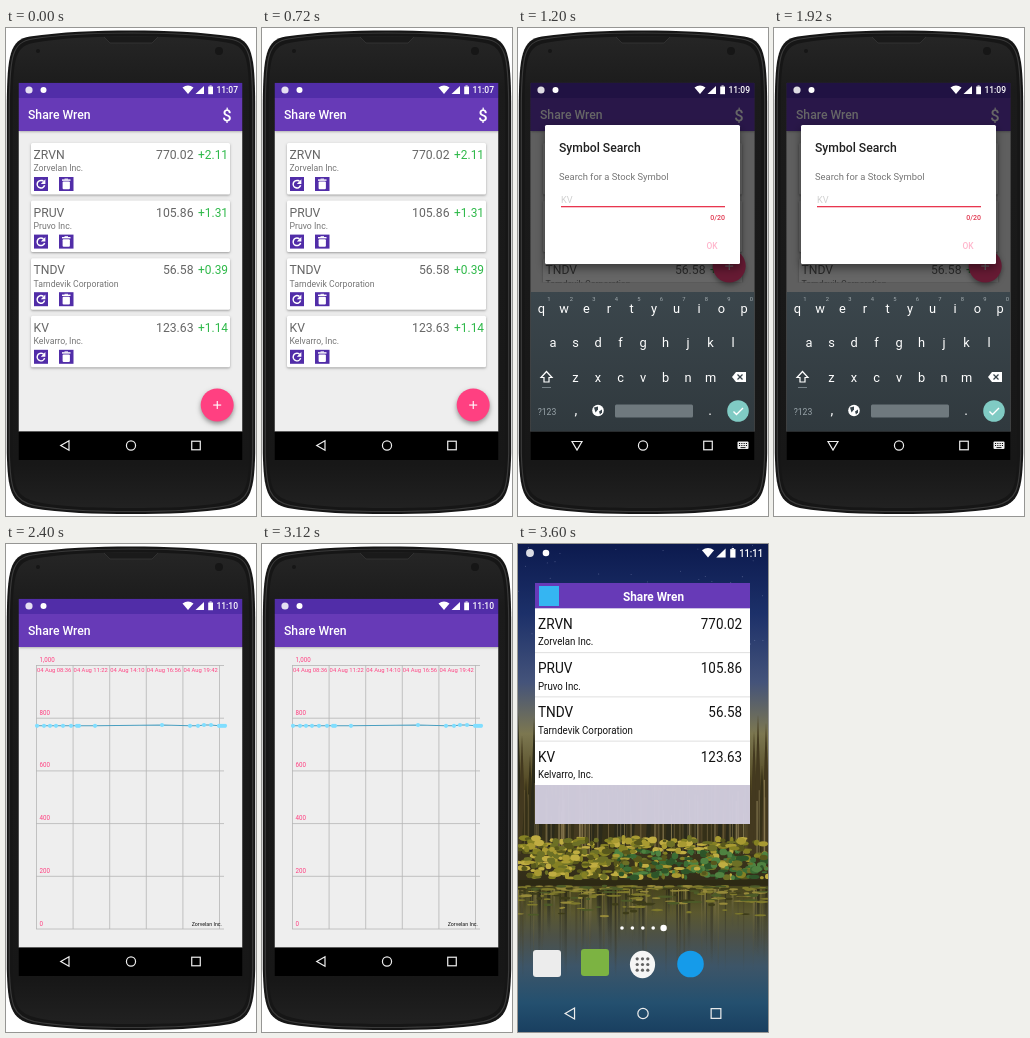
An HTML page with a canvas that plays this animation: 250x488 px, repeating every 4800 ms.

```html
<!DOCTYPE html>
<html lang="en">
<head>
<meta charset="utf-8">
<title>Share Wren</title>
<style>
html, body { margin: 0; width: 100%; height: 100%; overflow: hidden; background: #fff; }
canvas { display: block; width: 250px; height: 488px; }
</style>
</head>
<body>
<canvas id="stage"></canvas>
<script>
const W = 250, H = 488, HOLD = 1200;
const canvas = document.getElementById('stage');
const ctx = canvas.getContext('2d');
const dpr = window.devicePixelRatio || 1;
canvas.width = W * dpr;
canvas.height = H * dpr;

const APP = 'Share Wren';
const PURPLE = '#673ab7', DEEP = '#512da8', PINK = '#ff4081';
const LEFT = 12.5, TOP = 54.7, WIDE = 224, NAV = 403.6, BOTTOM = 432;
const STOCKS = [
  ['ZRVN', 'Zorvelan Inc.', '770.02', '+2.11'],
  ['PRUV', 'Pruvo Inc.', '105.86', '+1.31'],
  ['TNDV', 'Tarndevik Corporation', '56.58', '+0.39'],
  ['KV', 'Kelvarro, Inc.', '123.63', '+1.14']
];

// Vertical pixel aspect of the current screen
let aspect = 1;

function text(s, x, y, size, color, align = 'left', weight = 400) {
  ctx.save();
  ctx.translate(x, y);
  ctx.scale(1, aspect);
  ctx.font = `${weight} ${size}px Roboto, sans-serif`;
  ctx.textAlign = align;
  ctx.fillStyle = color;
  ctx.fillText(s, 0, 0);
  ctx.restore();
}

function rect(x, y, w, h, color) {
  ctx.fillStyle = color;
  ctx.fillRect(x, y, w, h);
}

function round(x, y, w, h, r, color) {
  ctx.beginPath();
  ctx.roundRect(x, y, w, h, r);
  ctx.fillStyle = color;
  ctx.fill();
}

function oval(x, y, rx, ry, color) {
  ctx.beginPath();
  ctx.ellipse(x, y, rx, ry, 0, 0, Math.PI * 2);
  ctx.fillStyle = color;
  ctx.fill();
}

function dot(x, y, r, color) {
  oval(x, y, r, r, color);
}

function trace(points, closed) {
  ctx.beginPath();
  points.forEach(([x, y]) => ctx.lineTo(x, y));
  if (closed) ctx.closePath();
}

function poly(points, color) {
  trace(points, true);
  ctx.fillStyle = color;
  ctx.fill();
}

function line(points, color, width = 1, closed = false) {
  trace(points, closed);
  ctx.strokeStyle = color;
  ctx.lineWidth = width;
  ctx.stroke();
}

function ring(x, y, r, color, width, from = 0, to = Math.PI * 2) {
  ctx.beginPath();
  ctx.arc(x, y, r, from, to);
  ctx.strokeStyle = color;
  ctx.lineWidth = width;
  ctx.stroke();
}

function gradient(y0, y1, stops) {
  const g = ctx.createLinearGradient(0, y0, 0, y1);
  stops.forEach(([at, color]) => g.addColorStop(at, color));
  return g;
}

function shadow(blur, dy, alpha, draw) {
  ctx.save();
  ctx.shadowColor = `rgba(0,0,0,${alpha})`;
  ctx.shadowBlur = blur * dpr;
  ctx.shadowOffsetY = dy * dpr;
  draw();
  ctx.restore();
}

function clipped(x, y, w, h, draw) {
  ctx.save();
  ctx.beginPath();
  ctx.rect(x, y, w, h);
  ctx.clip();
  draw();
  ctx.restore();
}

function random(seed) {
  return () => (seed = (seed * 16807) % 2147483647) / 2147483647;
}

function bodyPath(d) {
  const l = 0.8 + d, r = W - l, t = 2.5 + d, b = 486 - d;
  ctx.beginPath();
  ctx.moveTo(l, 75);
  ctx.bezierCurveTo(l + 0.5, 28, l + 3, t + 9, l + 23, t + 6);
  ctx.bezierCurveTo(55, t + 1.5, 90, t, 125, t);
  ctx.bezierCurveTo(160, t, 195, t + 1.5, r - 23, t + 6);
  ctx.bezierCurveTo(r - 3, t + 9, r - 0.5, 28, r, 75);
  ctx.lineTo(r, 425);
  ctx.bezierCurveTo(r - 1, 462, r - 4, b - 11, r - 25, b - 6);
  ctx.bezierCurveTo(195, b - 1, 160, b, 125, b);
  ctx.bezierCurveTo(90, b, 55, b - 1, l + 25, b - 6);
  ctx.bezierCurveTo(l + 4, b - 11, l + 1, 462, l, 425);
  ctx.closePath();
}

function phone() {
  bodyPath(0);
  ctx.fillStyle = '#161616';
  ctx.fill();
  bodyPath(2.5);
  ctx.strokeStyle = '#3a3a3a';
  ctx.lineWidth = 1.2;
  ctx.stroke();
  bodyPath(6);
  ctx.fillStyle = gradient(5, 484, [[0, '#262626'], [0.12, '#1b1b1b'], [0.9, '#171717'], [1, '#222']]);
  ctx.fill();
  poly([[98, 9], [152, 9], [146, 15], [104, 15]], '#1a1a1a');
  line([[98, 9], [104, 15], [146, 15], [152, 9]], '#353535', 0.8);
  dot(213, 23, 4, '#161616');
  dot(32, 23, 2, '#161616');
}

function statusIcons(left, right, y, time, size, k = 1) {
  dot(left, y, 3.6 * k, 'rgba(255,255,255,.85)');
  dot(left + 14.5 * k, y, 3 * k, '#fff');
  const wx = right - 50 * k, sx = right - 34 * k, bx = right - 27.5 * k;
  ctx.beginPath();
  ctx.moveTo(wx, y + 4 * k);
  ctx.lineTo(wx - 5.5 * k, y - 2.5 * k);
  ctx.quadraticCurveTo(wx, y - 6.5 * k, wx + 5.5 * k, y - 2.5 * k);
  ctx.fillStyle = '#fff';
  ctx.fill();
  poly([[sx, y - 4 * k], [sx, y + 4 * k], [sx - 8.5 * k, y + 4 * k]], '#fff');
  rect(bx - 2.3 * k, y - 3.5 * k, 4.8 * k, 7.7 * k, '#fff');
  rect(bx - 1 * k, y - 4.5 * k, 2.2 * k, 1, '#fff');
  text(time, right, y + 3.2 * k, size, '#fff', 'right', 500);
}

function navBar([a, b, c], y, k, down) {
  const tri = down
    ? [[a - 5, y - 4], [a + 5, y - 4], [a, y + 4.5]]
    : [[a + 4.2 * k, y - 5 * k], [a + 4.2 * k, y + 5 * k], [a - 4.5 * k, y]];
  line(tri, '#eee', 1.2, true);
  ring(b, y, 4.8 * k, '#eee', 1.2);
  ctx.strokeRect(c - 4.5 * k, y - 4.5 * k, 9 * k, 9 * k);
}

function toolbar(withDollar) {
  rect(LEFT, 103, WIDE, NAV - 103, '#eee');
  shadow(2, 0.7, 0.25, () => rect(LEFT, 70, WIDE, 33, PURPLE));
  rect(LEFT, TOP, WIDE, 70 - TOP, DEEP);
  text(APP, 22, 91, 12.2, '#fff', 'left', 500);
  if (withDollar) text('$', 221, 92.5, 16.5, '#fff', 'center', 500);
}

function refreshIcon(x, y) {
  rect(x, y, 14, 14, DEEP);
  ring(x + 7, y + 7.2, 3.8, '#fff', 1.5, 0.3, 5.4);
  poly([[x + 11.4, y + 2.3], [x + 11.4, y + 7], [x + 6.8, y + 7]], '#fff');
}

function trashIcon(x, y) {
  rect(x, y, 14.5, 14, DEEP);
  rect(x + 3, y + 2.4, 8.5, 1.4, '#fff');
  rect(x + 5.5, y + 1.6, 3.5, 1, '#fff');
  round(x + 3.6, y + 4.6, 7.3, 7.6, 1, '#fff');
}

function stockList(bottom) {
  clipped(LEFT, 103, WIDE, bottom - 103, () => STOCKS.forEach(([symbol, name, price, change], i) => {
    const y = 115 + i * 57.6;
    shadow(2.5, 1, 0.35, () => round(25, y, 199, 51.5, 1.5, '#fff'));
    text(symbol, 27.5, y + 16, 12.2, '#666');
    text(price, 187.5, y + 16, 12.2, '#666', 'right');
    text(change, 222, y + 16, 11.9, '#2fb94a', 'right');
    text(name, 27.5, y + 28.4, 8.7, '#757575');
    refreshIcon(28, y + 34);
    trashIcon(53, y + 34);
  }));
}

function fab(y) {
  shadow(5, 2.5, 0.4, () => dot(211.2, y, 16.5, PINK));
  rect(207.2, y - 0.5, 8, 1.1, '#fff');
  rect(210.7, y - 4, 1.1, 8, '#fff');
}

function keyboardIcon(x, y) {
  round(x, y, 11, 7.5, 1, '#eee');
  for (let i = 0; i < 8; i++) {
    rect(x + 1.5 + (i % 4) * 2.3, y + 1.5 + Math.floor(i / 4) * 2, 1.1, 1, '#000');
  }
  rect(x + 3, y + 5.7, 5, 0.9, '#000');
}

function inPhone(time, draw, typing) {
  aspect = 1.02;
  rect(0, 0, W, H, '#fff');
  phone();
  clipped(LEFT, TOP, WIDE, BOTTOM - TOP, () => {
    draw();
    rect(LEFT, NAV, WIDE, BOTTOM - NAV, '#000');
    navBar([59, 125, 190], 417.5, 0.95, typing);
    statusIcons(23, 232, 62, time, 8.5);
    if (typing) keyboardIcon(219.5, 413.5);
  });
}

function listScreen() {
  inPhone('11:07', () => {
    toolbar(true);
    stockList(NAV);
    fab(377);
  });
}

function keyRow(keys, x, y) {
  [...keys].forEach((key, i) => text(key, x + i * 22.5, y, 12.8, '#fff', 'center'));
}

function keyboard() {
  rect(LEFT, 264, WIDE, NAV - 264, gradient(264, NAV, [[0, '#3b464c'], [1, '#30393e']]));
  keyRow('qwertyuiop', 23.5, 285);
  [...'1234567890'].forEach((n, i) => text(n, 31 + i * 22.5, 272.5, 5.8, '#a4adb1', 'center'));
  keyRow('asdfghjkl', 35, 319);
  keyRow('zxcvbnm', 57.5, 353.5);
  line([[28.5, 343.5], [34, 349.5], [31, 349.5], [31, 354], [26, 354], [26, 349.5], [23, 349.5]], '#fff', 1.2, true);
  rect(24, 359, 9, 0.8, '#89949a');
  poly([[214, 349], [218, 344], [228, 344], [228, 354], [218, 354]], '#fff');
  line([[219.5, 346.5], [224.5, 351.5]], '#37434a', 1.2);
  line([[224.5, 346.5], [219.5, 351.5]], '#37434a', 1.2);
  text('?123', 29, 387, 8.6, '#9aa5aa', 'center');
  text(',', 58, 387, 14, '#fff', 'center');
  text('.', 192, 387, 14, '#fff', 'center');
  dot(80, 382.5, 5.8, '#fff');
  poly([[76, 379.5], [80, 378.5], [80, 381.5], [77.5, 384.5]], '#37434a');
  poly([[81, 383.5], [84, 381.5], [84, 384.5], [82, 386.5]], '#37434a');
  round(97, 376.5, 78, 13, 1.5, '#6f797e');
  dot(220, 383, 10.8, '#80cbc4');
  line([[215.5, 383.5], [218.5, 386.5], [225, 380]], '#fff', 1.4);
}

function searchScreen() {
  inPhone('11:09', () => {
    toolbar(true);
    stockList(254.6);
    fab(238);
    rect(LEFT, TOP, WIDE, NAV - TOP, 'rgba(0,0,0,.6)');
    shadow(10, 4, 0.45, () => round(27, 97, 195, 139, 1.5, '#fff'));
    text('Symbol Search', 41, 124, 12.2, '#212121', 'left', 500);
    text('Search for a Stock Symbol', 41, 151.5, 9.4, '#757575');
    text('KV', 43, 175, 9.2, '#d0d0d0');
    rect(43, 178, 164, 1.3, '#e8364f');
    text('0/20', 207, 192, 7, '#e0354d', 'right', 500);
    text('OK', 194, 220.5, 8.4, '#ffb6cc', 'center', 500);
    keyboard();
  }, true);
}

function chartScreen() {
  inPhone('11:10', () => {
    toolbar(false);
    for (let i = 0; i <= 5; i++) {
      const y = 121.5 + i * 52.7, x = 30.5 + i * 36.6;
      line([[30, y], [218, y]], '#b5b5b5', 0.8);
      line([[x, 121], [x, 385]], '#b5b5b5', 0.8);
      text((1000 - i * 200).toLocaleString('en-US'), 33.5, y - 3.5, 6.2, PINK);
    }
    ['08:36', '11:22', '14:10', '16:56', '19:42'].forEach((t, i) =>
      text('04 Aug ' + t, 31 + i * 36.6, 127.5, 5.85, PINK));
    const xs = [31, 38, 44, 50, 57, 65, 71, 73, 89, 156, 184, 192, 198, 205, 213, 215, 217, 219];
    const points = xs.map(x => [x, x === 156 || x === 198 || x === 205 ? 181 : 181.8]);
    line(points, '#4a9fc0', 1.1);
    points.forEach(([x, y]) => dot(x, y, 2.1, '#80deff'));
    text(STOCKS[0][1], 216, 382, 5.3, '#111', 'right');
  });
}

function pick(list, rnd) {
  return list[Math.floor(rnd() * list.length)];
}

function landscape() {
  const rnd = random(41);
  rect(0, 0, W, 345, gradient(0, 345, [
    [0, '#0c1a4e'], [0.2, '#1c3069'], [0.4, '#44537a'], [0.55, '#7c7750'], [0.7, '#514722'], [1, '#2f2a18']
  ]));
  for (let i = 0; i < 60; i++) dot(rnd() * W, rnd() * 120, 0.4, 'rgba(220,225,255,.6)');
  for (let x = -4; x < W + 4; x += 4) {
    const edge = Math.abs(x - 125) / 125;
    const top = 245 - edge * 75 * rnd() - 25 * rnd();
    poly([[x, top], [x + 5, 310], [x - 5, 310]], pick(['#2b2a1a', '#43391f', '#353018'], rnd));
  }
  for (let i = 0; i < 75; i++) {
    const x = rnd() * W;
    line([[x, 235 + rnd() * 40], [x, 310]], pick(['#8a7a50', '#6b5d38', '#a39366'], rnd), 0.4 + rnd() * 0.5);
  }
  rect(0, 342, W, H - 342, gradient(342, H, [
    [0, '#45431b'], [0.18, '#5b582f'], [0.35, '#4c5148'], [0.55, '#3d5568'], [0.8, '#24506f'], [1, '#193f60']
  ]));
  for (let i = 0; i < 110; i++) {
    const x = rnd() * W, end = 370 + rnd() * 65;
    line([[x, 345], [x, end]], gradient(345, end, [[0, pick(['#2c2915', '#85793e', '#4d4520'], rnd)], [1, 'rgba(60,65,60,0)']]), 0.6 + rnd() * 2.2);
  }
  for (let i = 0; i < 600; i++) {
    const x = rnd() * W, y = 294 + rnd() * 40;
    const tones = x > 100 && y > 306 && rnd() < 0.6
      ? ['#3c6d35', '#4f8241', '#2e5529']
      : ['#858124', '#a89a32', '#6d7026', '#c0ad42', '#57571c'];
    oval(x, y, 1.5 + rnd() * 4, 1 + rnd() * 2.5, pick(tones, rnd));
  }
  rect(0, 336, W, 5, 'rgba(45,42,18,.85)');
  for (let i = 0; i < 220; i++) {
    oval(rnd() * W, 342 + rnd() * rnd() * 32, 2 + rnd() * 6, 0.5 + rnd(), pick(['#7f7a2c', '#3d3c19', '#968a3a', '#4c5a28'], rnd));
  }
}

function widget() {
  rect(17, 39, 215, 241, 'rgba(211,207,224,.96)');
  rect(17, 39, 215, 25.5, PURPLE);
  rect(21, 42, 20, 20, '#35b5f2');
  text(APP, 135.5, 56.5, 11.8, '#fff', 'center', 600);
  rect(17, 64.5, 215, 176.5, '#fff');
  STOCKS.forEach(([symbol, name, price], i) => {
    const y = 64.5 + i * 44.2;
    if (i) rect(17, y - 0.4, 215, 0.8, '#d8d8d8');
    text(symbol, 20, y + 20.5, 13.6, '#111');
    text(price, 224, y + 20.5, 13.4, '#111', 'right');
    text(name, 20, y + 36.8, 9.7, '#111');
  });
}

function homeScreen() {
  aspect = 1.1;
  landscape();
  widget();
  for (let i = 0; i < 5; i++) dot(104 + i * 10.4, 384, i === 4 ? 3.2 : 1.8, '#fff');
  round(15, 406, 28, 27, 3, '#ececec');
  round(63, 405, 28, 27, 3, '#7cb342');
  oval(124.5, 420.5, 12.6, 13.8, '#f5f5f5');
  for (let i = 0; i < 9; i++) dot(119.2 + (i % 3) * 5.3, 414.8 + Math.floor(i / 3) * 5.7, 1.6, '#616161');
  dot(172.5, 420, 13.3, '#159bea');
  navBar([52, 125, 198], 469.5, 1.08);
  statusIcons(12, 245, 9, '11:11', 9.4, 1.1);
}

const screens = [listScreen, searchScreen, chartScreen, homeScreen];
let start = null;

function tick(now) {
  if (start === null) start = now;
  const index = Math.floor((now - start) / HOLD) % screens.length;
  ctx.setTransform(dpr, 0, 0, dpr, 0, 0);
  screens[index]();
  requestAnimationFrame(tick);
}
requestAnimationFrame(tick);
</script>
</body>
</html>
```
